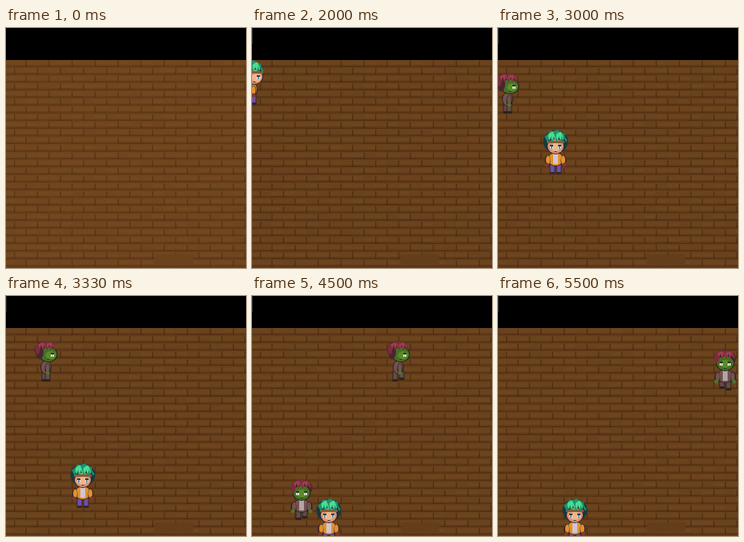
Animation of 300x300 px, one loop 5.67 s. Source, as an HTML page with a canvas:

```html
<!DOCTYPE html>
<html lang="en">
<head>
<meta charset="utf-8">
<title>Brick room</title>
<style>
html, body { margin: 0; width: 100%; height: 100%; overflow: hidden; background: #000; }
canvas { display: block; width: 300px; height: 300px; }
</style>
</head>
<body>
<canvas id="stage" width="300" height="300"></canvas>
<script>
const LOOP = 5670, STEPS = 34, STEP = LOOP / STEPS;
const SIDES = [-1, 1];
const ctx = document.getElementById('stage').getContext('2d');
let g = ctx;

const clamp = (v, low, high) => Math.max(low, Math.min(high, v));

function rect(color, x, y, w, h) {
  g.fillStyle = color;
  g.fillRect(x, y, w, h);
}

function oval(color, x, y, rx, ry) {
  g.fillStyle = color;
  g.beginPath();
  g.ellipse(x, y, rx, ry, 0, 0, 7);
  g.fill();
}

// A spiky cap: points around the top half, a zigzag fringe below.
function spikes(color, x, y, rx, ry, n) {
  g.fillStyle = color;
  g.beginPath();
  for (let i = 0; i <= n; i++) {
    const a = Math.PI * (1 + i / n), r = i % 2 ? 1 : .86;
    g.lineTo(x + Math.cos(a) * rx * r, y + Math.sin(a) * ry * r);
  }
  for (let i = n; i >= 0; i--) {
    g.lineTo(x + rx * (2 * i / n - 1) * .9, y + (i % 2 ? 3 : -3));
  }
  g.fill();
}

const hero = {
  neck: 29, height: 56, width: 15.5, faceY: 21, face: 10,
  edge: '#3a2430', back: '#143a40', hair: '#1d9070', shine: '#4cdd8e', band: '#8a5a32',
  skin: '#dc946c', glow: '#f0b58c', eye: '#4f93bd', brow: '#273d50',
  coat: '#e0932a', shirt: '#d2c4d4', hand: '#83382e', legs: '#6c52a8'
};
const zombie = {
  neck: 25, height: 51, width: 13.5, faceY: 17, face: 10.5,
  edge: '#2a231e', back: '#4a2430', hair: '#7a2d3a', shine: '#a04150',
  skin: '#456f24', glow: '#5b8a2c', eye: '#c3cc94', brow: '#263618',
  coat: '#735250', shirt: '#b3a5a2', hand: '#4d7529', legs: '#664a4a'
};

function drawLegs(look, step, side) {
  const hip = look.neck + 12, len = look.height - hip;
  for (const s of SIDES) {
    const swing = step % 2 ? s * (step - 2) : 0;
    const x = side ? s * 2 + swing * 2 : s * 4;
    const h = len - Math.max(0, swing) * 2;
    rect(look.edge, x - 3.5, hip, 7, h);
    rect(look.legs, x - 2.5, hip, 5, h - 3);
  }
}

function drawBody(look, side) {
  const y = look.neck + 8;
  oval(look.edge, 0, y, side ? 7 : 10, 9);
  oval(look.coat, 0, y, side ? 6 : 9, 8);
  if (!side) rect(look.shirt, -3, look.neck, 6, 14);
  for (const s of side ? [0] : SIDES) {
    const x = s * 10 + (side ? 2 : 0);
    oval(look.edge, x, y + 2, 3.5, 7);
    oval(look.coat, x - s * .5, y + 1, 2.5, 5.5);
    oval(look.hand, x + s, y + 7, 2.5, 2.5);
  }
}

function drawHead(look, side) {
  const { width: w, faceY, face } = look, turn = side ? 3 : 0, crown = faceY - 7;
  oval(look.back, side ? -2 : 0, crown + 1, side ? w - 1 : w, crown);
  oval(look.edge, turn, faceY, face + 1, 10);
  oval(look.skin, turn, faceY, face, 9);
  oval(look.glow, turn * 2, faceY + 1, face - 4, 5);
  for (const s of side ? [1] : SIDES) {
    const x = turn + s * 5 - 2;
    rect(look.brow, x, faceY - 2, 4, 2);
    rect('#dde8e0', x, faceY, 4, 3);
    rect(look.eye, x + 1, faceY, 2, 3);
  }
  rect(look.brow, turn - 1.5, faceY + 6, 3, 1);
  if (side) oval(look.back, -8, faceY - 3, 5, 9);
  if (look.band) rect(look.band, turn - 11, crown, 22, 3);
  else oval(look.hair, -w + 3, crown, 3, 7);
  spikes(look.hair, 0, crown - 1, w - 1, crown - 1, 9);
  for (const s of SIDES) spikes(look.shine, s * 5, crown - 3, 5, crown - 5, 5);
}

function put(look, pos, step) {
  g.save();
  g.translate(Math.round(pos.x), Math.round(pos.y));
  drawLegs(look, step, pos.side);
  drawBody(look, pos.side);
  drawHead(look, pos.side);
  g.restore();
}

// Positions in pixels from the time in seconds.
function heroAt(t) {
  return { x: Math.min(96, 72 * (t - 2)), y: clamp(45 + 245 * (t - 2.667), 40, 253), side: t < 2.6 };
}

function zombieAt(t, start, y, corner) {
  const pace = 114, turnTime = start + (corner + 16) / pace;
  const side = t < turnTime;
  return side
    ? { x: pace * (t - start) - 16, y, side }
    : { x: corner, y: y + 95 * (t - turnTime), side };
}

function makeWall() {
  const wall = document.createElement('canvas');
  wall.width = wall.height = 300;
  g = wall.getContext('2d');
  let seed = 7;
  const rnd = () => (seed = seed * 16807 % 2147483647) / 2147483647;
  const rowH = 9.6, half = 14.4, mortar = 'rgba(62,34,13,.6)';
  for (let row = 0; row < 28; row++) {
    const y = 39.6 + row * rowH;
    rect('#69421d', 0, y, 300, rowH + 1);
    for (let i = -1; i < 21; i++) {
      const x = i * half + 10;
      rect(`rgba(125,80,36,${rnd() * .25})`, x, y + 2, half, 4);
      rect('rgba(62,34,13,.25)', x, y + rowH - 2.8, half, 1.5);
      rect(mortar, x, y + rowH - 1.5 + rnd() * .6, half, 1.3);
      if ((i + row) % 2) rect(mortar, x, y + 1, 1.3, rowH - 2);
    }
  }
  rect('#643e1b', 186, 283, 48, 14);
  rect('#000', 0, 0, 300, 40);
  g = ctx;
  return wall;
}

function drawPointer(x, y) {
  g.fillStyle = '#eee';
  g.strokeStyle = '#222';
  g.beginPath();
  g.moveTo(x, y);
  g.lineTo(x, y + 9);
  g.lineTo(x + 6, y + 6);
  g.closePath();
  g.fill();
  g.stroke();
}

const wall = makeWall();

function draw(now) {
  // A small lead keeps each step clear of rounding at its boundary.
  const tick = Math.floor((now + 10) % LOOP / STEP);
  const t = tick * STEP / 1000, step = tick % 4;
  g.drawImage(wall, 0, 0);

  // The room settles to its darker tone during the first second.
  rect(`rgba(165,96,42,${.1 * Math.max(0, 1 - t)})`, 0, 40, 300, 260);
  if (t > 1.3) rect('#262626', 0, 0, 1, 20);

  put(zombie, zombieAt(t, 2.754, 56, 284), step);
  put(zombie, zombieAt(t, 3.772, 225, 62), step);
  if (t > 1.95) put(hero, heroAt(t), t < 3.5 ? step : 0);
  if (t > 4.6 && t < 5.1) drawPointer(209, 295);
}

const start = performance.now();
function frame() {
  draw(performance.now() - start);
  requestAnimationFrame(frame);
}
frame();
</script>
</body>
</html>
```
